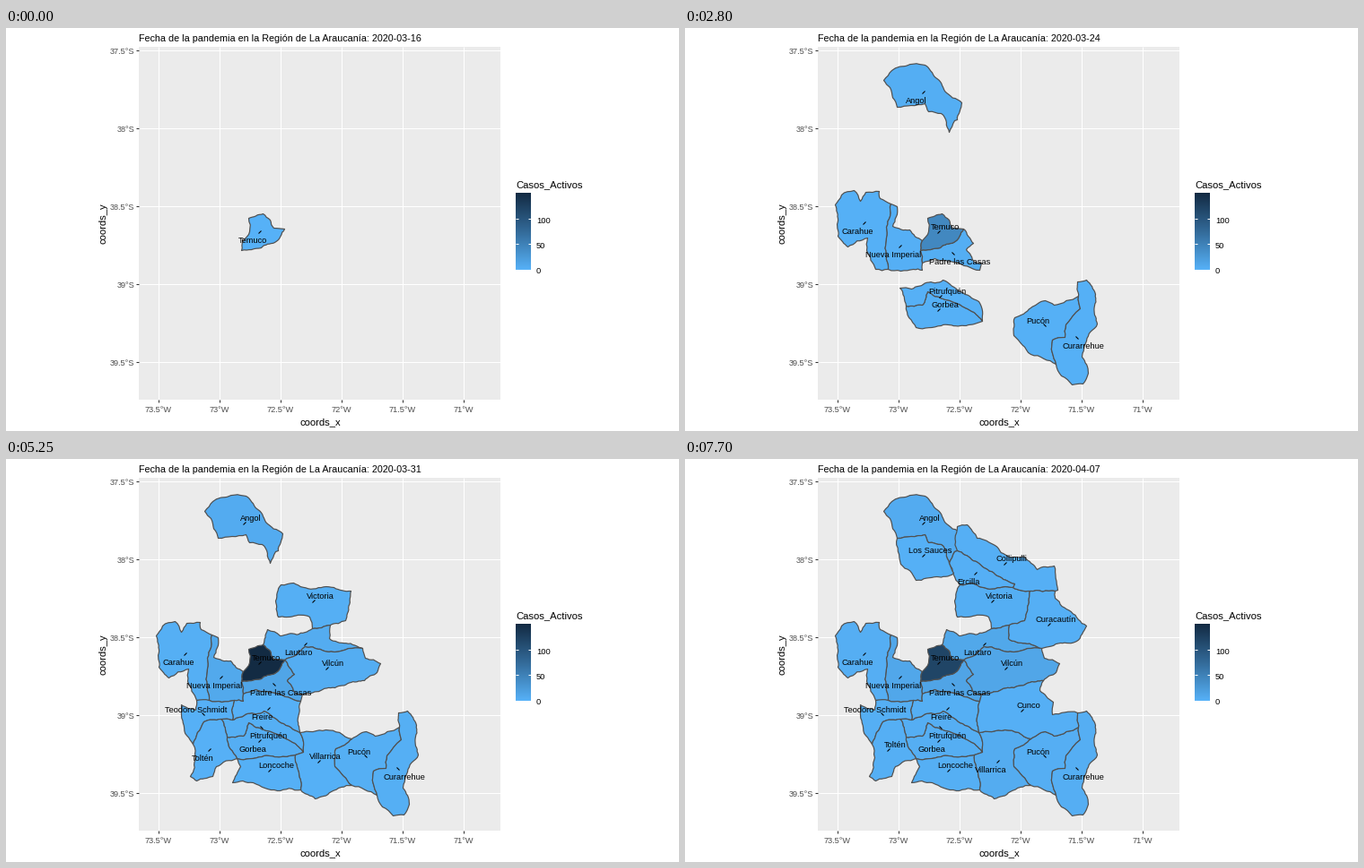
These frames come from a looping animation (750x450 px, 8000 ms). A matplotlib script:

```python
import math
import random

import matplotlib.pyplot as plt
import numpy as np
from matplotlib.animation import FuncAnimation
from matplotlib.colors import LinearSegmentedColormap
from matplotlib.patches import Polygon, Rectangle

W, H, DPI = 750, 450, 100
STEP, TICK, LOOP = 350, 50, 8000
START = np.datetime64("2020-03-16")
BLUES = LinearSegmentedColormap.from_list("cases", ["#56B1F7", "#336A98", "#132B43"])
MAX_CASES = 150
# Label offset from its anchor, by side
SIDES = {"NE": (7, -6), "NW": (-8, -5), "SE": (7, 9), "SW": (-8, 9)}

rng = random.Random(8)
plt.rcParams["font.family"] = "Liberation Sans"
fig = plt.figure(figsize=(W / DPI, H / DPI), dpi=DPI, facecolor="white")
ax = fig.add_axes([0, 0, 1, 1])
ax.axis("off")


def px(n):
    return n * 72 / DPI


def write(x, y, s, size, color="black", ha="center", va="baseline", **kw):
    return ax.text(x, y, s, fontsize=px(size), color=color, ha=ha, va=va, **kw)


def stroke(xs, ys, color, **kw):
    return ax.plot(xs, ys, color=color, lw=px(1.07), solid_capstyle="butt", **kw)[0]


def crinkle(p, q):
    """Split p-q by random midpoint displacement, leaving out q."""
    dx, dy = q[0] - p[0], q[1] - p[1]
    if math.hypot(dx, dy) < 4:
        return [p]
    k = rng.uniform(-0.1, 0.1)
    mid = ((p[0] + q[0]) / 2 - k * dy, (p[1] + q[1]) / 2 + k * dx)
    return crinkle(p, mid) + crinkle(mid, q)


def border(*v):
    pts = list(zip(v[::2], v[1::2]))
    return [p for a, b in zip(pts, pts[1:]) for p in crinkle(a, b)] + pts[-1:]


def ring(first, *rest):
    """Join borders end to end, turning each one as needed."""
    def gap(p, arc):
        return min(math.dist(p, arc[0]), math.dist(p, arc[-1]))

    if rest and gap(first[0], rest[0]) < gap(first[-1], rest[0]):
        first = first[::-1]
    out = list(first)
    for arc in rest:
        ahead = math.dist(out[-1], arc[0]) <= math.dist(out[-1], arc[-1])
        out += arc if ahead else arc[::-1]
    return np.array(out) + 0.5


# Panel, axes and legend
ax.add_patch(Rectangle((148, 21), 403, 394, fc="#EBEBEB", ec="none", zorder=0))
for i in range(6):
    x = 169.5 + 68.1 * i
    stroke([x, x], [21, 415], "white", zorder=1)
    stroke([x, x], [415, 418], "#333333", zorder=1)
    write(x, 429, f"{73.5 - i / 2:g}°W", 9.2, "#4D4D4D")
for i in range(5):
    y = 25.05 + 87.05 * i
    stroke([148, 551], [y, y], "white", zorder=1)
    stroke([145, 148], [y, y], "#333333", zorder=1)
    write(143.5, y + 4, f"{37.5 + i / 2:g}°S", 9.2, "#4D4D4D", "right")
write(350, 443, "coords_x", 11.2)
write(109, 218, "coords_y", 11.2, rotation=90, va="center")
title = write(148, 15, "", 10.75, ha="left")

write(568, 178, "Casos_Activos", 11.2, ha="left")
ax.imshow(np.linspace(1, 0, 86)[:, None], cmap=BLUES, extent=(568, 585, 270, 184),
          aspect="auto", zorder=1)
ax.set(xlim=(0, W), ylim=(H, 0))
for v in (0, 50, 100):
    y = 269.5 - v * 0.57
    for x in (568, 582):
        stroke([x, x + 3], [y, y], "white", zorder=2)
    write(591, y + 5, str(v), 9.4, ha="left")

# Borders between two comunas
tem_imp = border(262, 248, 264, 237)
tem_lau = border(286, 207, 294, 214, 298, 223, 310, 224)
tem_pad = border(310, 224, 299, 239, 284, 245, 262, 248)
pad_vil = border(310, 224, 321, 240, 313, 247, 322, 261, 330, 262)
pad_fre = border(328, 270, 300, 261, 278, 257, 264, 262)
pad_imp = border(264, 262, 262, 248)
car_imp = border(229, 196, 224, 222, 226, 269)
imp_fre = border(264, 262, 264, 270, 254, 269)
imp_teo = border(254, 269, 226, 269)
ang_sau = border(294, 116, 285, 95, 271, 93, 267, 84, 236, 88)
ang_erc = border(303, 102, 300, 103, 294, 116)
col_erc = border(365, 143, 367, 139, 335, 122, 303, 102)
vic_erc = border(306, 140, 320, 138, 365, 143)
vic_col = border(365, 143, 384, 147)
vic_cur = border(384, 147, 378, 180, 361, 185)
vic_lau = border(361, 185, 341, 189)
col_cur = border(412, 147, 384, 147)
lau_cur = border(361, 185, 360, 200, 397, 211)
lau_vil = border(397, 211, 366, 215, 333, 209, 310, 224)
vil_cun = border(399, 247, 366, 255, 330, 262)
fre_cun = border(328, 270, 327, 305)
fre_teo = border(254, 269, 252, 291)
pit_fre = border(252, 291, 287, 281, 327, 305)
pit_vla = border(327, 305, 331, 327)
pit_gor = border(331, 327, 305, 308, 270, 294, 264, 309, 246, 310)
pit_tol = border(246, 310, 239, 290)
pit_teo = border(239, 290, 252, 291)
gor_tol = border(246, 310, 257, 334)
gor_lon = border(257, 334, 285, 332, 322, 330)
teo_tol = border(239, 290, 220, 293, 208, 318)
lon_vla = border(322, 330, 326, 350, 328, 369)
vla_cun = border(327, 305, 356, 302, 385, 312)
vla_puc = border(385, 312, 367, 323, 366, 343, 385, 364)
puc_cun = border(385, 312, 401, 304, 411, 309, 438, 299)
puc_rre = border(438, 299, 440, 313, 424, 331, 423, 345, 409, 348, 413, 375)
rre_cun = border(438, 299, 437, 283)

comunas = []


def comuna(name, anchor, sides, *arcs, peak=3):
    """sides: label side from each day on; the first day is the first case."""
    shape = Polygon(ring(*arcs), closed=True, ec="#505050", lw=px(1.2),
                    joinstyle="round", zorder=3)
    ax.add_patch(shape)
    leader = stroke([], [], "black", zorder=4)
    label = write(0, 0, name, 9.25, zorder=5)
    comunas.append((name, shape, leader, label, anchor, sides, peak))


comuna("Angol", (266, 72), {2: "NE", 5: "SW", 6: "NE", 7: "SW", 14: "NE"},
       ang_erc, ang_sau,
       border(236, 88, 228, 66, 221, 58, 230, 47, 267, 41, 289, 70, 308, 83, 303, 102),
       peak=6)
comuna("Carahue", (200, 218),
       {7: "NE", 8: "SW", 10: "NE", 12: "SW", 13: "NE", 14: "SW"}, car_imp,
       border(226, 269, 212, 269, 202, 248, 203, 234, 181, 244, 170, 232, 167, 197,
              174, 186, 188, 181, 195, 193, 201, 183, 216, 182, 217, 190, 229, 196))
comuna("Nueva Imperial", (240, 244), {7: "SW"},
       tem_imp, pad_imp, imp_fre, imp_teo, car_imp,
       border(229, 196, 236, 199, 231, 221, 250, 225, 264, 237), peak=11)
comuna("Padre las Casas", (299, 252), {6: "SE"},
       tem_pad, pad_vil, pad_fre, pad_imp, peak=14)
comuna("Gorbea", (283, 315), {5: "NE", 14: "SW"}, gor_tol, gor_lon, pit_gor)
comuna("Pitrufquén", (285, 300), {8: "NE", 14: "SE"},
       pit_tol, pit_teo, pit_fre, pit_vla, pit_gor)
comuna("Pucón", (401, 332), {7: "NW"},
       puc_cun, puc_rre, border(413, 375, 385, 364), vla_puc)
comuna("Curarrehue", (437, 346), {6: "NW", 8: "SE", 9: "NW", 10: "SE"},
       puc_rre, rre_cun,
       border(437, 283, 447, 281, 457, 297, 459, 330, 447, 349, 442, 367, 449, 385,
              443, 397, 431, 398, 419, 388, 413, 375))
comuna("Victoria", (343, 159), {9: "NE"}, vic_erc, vic_col, vic_cur, vic_lau,
       border(341, 189, 338, 176, 303, 176, 300, 158, 306, 140), peak=4)
comuna("Lautaro", (334, 207), {10: "NE", 14: "SW"}, vic_lau, lau_cur, lau_vil, tem_lau,
       border(286, 207, 291, 190, 305, 197, 341, 189), peak=10)
comuna("Vilcún", (358, 234), {12: "NE", 19: "SW", 20: "NE"}, lau_vil, pad_vil, vil_cun,
       border(399, 247, 413, 238, 417, 228, 400, 222, 397, 211), peak=12)
comuna("Villarrica", (349, 338), {14: "NE", 21: "SW"}, vla_cun, vla_puc,
       border(385, 364, 362, 371, 344, 379, 328, 369), lon_vla, pit_vla, peak=7)
comuna("Loncoche", (294, 348), {14: "NE", 18: "SW", 20: "NE"}, gor_lon, lon_vla,
       border(328, 369, 302, 370, 275, 361, 252, 361, 261, 343, 257, 334))
comuna("Freire", (293, 279), {15: "SW", 18: "NE", 20: "SW"},
       pad_fre, imp_fre, fre_teo, pit_fre, fre_cun)
comuna("Teodoro Schmidt", (220, 285), {15: "NW"}, imp_teo, fre_teo, pit_teo, teo_tol,
       border(208, 318, 195, 274, 211, 280, 212, 269, 226, 269))
comuna("Toltén", (227, 325), {15: "SW", 21: "NE"}, teo_tol,
       border(208, 318, 211, 333, 205, 354, 212, 359, 230, 354, 234, 343, 257, 334),
       gor_tol, pit_tol)
comuna("Collipulli", (357, 117), {16: "SW", 18: "NE"}, col_cur, vic_col, col_erc,
       border(303, 102, 303, 75, 314, 73, 325, 88, 345, 96, 361, 109, 378, 109,
              392, 123, 411, 119, 415, 146, 412, 147))
comuna("Curacautín", (406, 185), {16: "NE"}, vic_cur, col_cur,
       border(412, 147, 412, 155, 447, 186, 436, 203, 418, 205, 397, 211), lau_cur)
comuna("Ercilla", (324, 128), {17: "SW"}, vic_erc, col_erc, ang_erc,
       border(294, 116, 306, 140))
comuna("Cunco", (376, 281), {18: "NE"}, vil_cun,
       border(399, 247, 395, 258, 410, 271, 409, 285, 437, 283),
       rre_cun, puc_cun, vla_cun, fre_cun)
comuna("Los Sauces", (266, 108), {21: "NE"}, ang_sau,
       border(236, 88, 240, 117, 257, 135, 280, 131, 299, 127, 294, 116))
comuna("Temuco", (283, 228), {0: "SW", 2: "NE"}, tem_imp, tem_pad, tem_lau,
       border(286, 207, 270, 212, 271, 227, 264, 237))


def cases(name, day, first, peak):
    if name == "Temuco":  # outbreak centre: logistic rise, then slow decline
        return 155 / (1 + math.exp((9.5 - day) / 1.6)) - 6 * max(0, day - 16)
    return 1 + (peak - 1) * min(1, (day - first) / 10)


def update(i):
    day = min(i * TICK // STEP, LOOP // STEP)
    title.set_text(f"Fecha de la pandemia en la Región de La Araucanía: {START + day}")
    for name, shape, leader, label, (x, y), sides, peak in comunas:
        first = min(sides)
        for artist in (shape, leader, label):
            artist.set_visible(day >= first)
        if day < first:
            continue
        shape.set_facecolor(BLUES(cases(name, day, first, peak) / MAX_CASES))
        dx, dy = SIDES[sides[max(d for d in sides if d <= day)]]
        sx, sy = math.copysign(1.5, dx), math.copysign(1.5, dy)
        leader.set_data([x - sx, x + sx], [y - sy, y + sy])
        label.set_position((x + dx, y + dy + 3.4))
    return []


anim = FuncAnimation(fig, update, frames=LOOP // TICK, interval=TICK,
                     init_func=lambda: update(0), repeat=True, repeat_delay=0)
plt.show()
```
